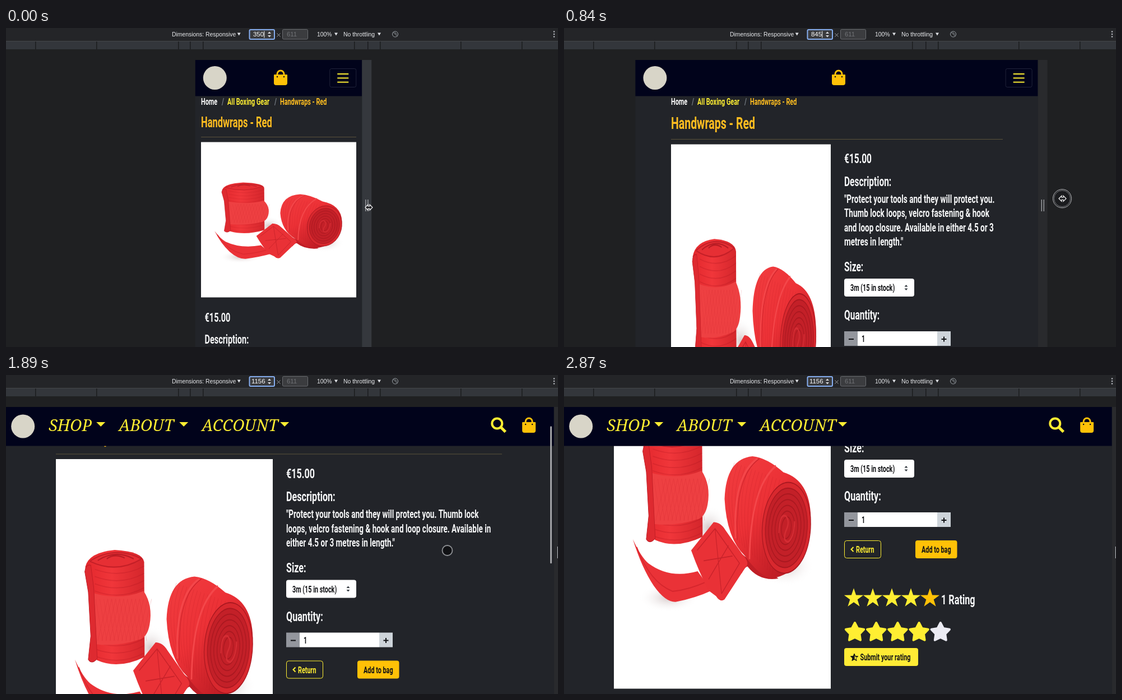
These frames come from a looping animation (985 px wide and 569 px high, 3150 ms). An HTML page with a canvas:

```html
<!DOCTYPE html>
<html lang="en">
<head>
<meta charset="utf-8">
<title>Responsive product page</title>
<style>
html, body { margin: 0; width: 100%; height: 100%; overflow: hidden; background: #1f2022; }
canvas { display: block; }
</style>
</head>
<body>
<canvas id="stage" width="985" height="569"></canvas>
<script>
const ctx = document.getElementById('stage').getContext('2d');
const LOOP = 3150, STEP = 70, ZOOM = 0.85, CENTER = 486.5;
const YELLOW = '#ffee32', AMBER = '#ffc107', INK = '#111215', PAGE = '#222429';
const CONDENSE = 0.66;

// Keyframes: [time, value, value, ...]
const widthKeys = [[350, 350], [420, 372], [490, 415], [560, 470], [630, 536], [700, 625], [770, 730],
  [840, 845], [910, 956], [980, 1040], [1050, 1120], [1120, 1156]];
const scrollKeys = [[1540, 0], [1750, 6], [1820, 22], [1890, 65.5], [1960, 172], [2030, 276.5], [2100, 280]];
const pointerKeys = [[350, 647, 320], [420, 662, 317], [630, 763, 308], [910, 931, 303], [980, 964, 302],
  [1050, 990, 303], [1120, 954, 311], [1540, 954, 311], [1890, 787, 313], [2240, 762, 330],
  [2590, 745, 370], [2870, 700, 590]];

function at(keys, t) {
  const i = keys.findIndex(k => k[0] > t);
  if (i < 0) return keys[keys.length - 1].slice(1);
  if (i === 0) return keys[0].slice(1);
  const a = keys[i - 1], b = keys[i], f = (t - a[0]) / (b[0] - a[0]);
  return a.slice(1).map((v, n) => v + (b[n + 1] - v) * f);
}

function rect(x, y, w, h, fill, radius = 0, stroke, line = 1) {
  ctx.beginPath();
  ctx.roundRect(x, y, w, h, radius);
  if (fill) { ctx.fillStyle = fill; ctx.fill(); }
  if (stroke) { ctx.strokeStyle = stroke; ctx.lineWidth = line; ctx.stroke(); }
}

function circle(x, y, r, fill, stroke, line = 1) {
  rect(x - r, y - r, 2 * r, 2 * r, fill, r, stroke, line);
}

function shape(d, fill, stroke, line = 1) {
  const path = new Path2D(d);
  if (fill) { ctx.fillStyle = fill; ctx.fill(path); }
  if (stroke) { ctx.strokeStyle = stroke; ctx.lineWidth = line; ctx.stroke(path); }
}

function place(x, y, draw) {
  ctx.save();
  ctx.translate(x, y);
  draw();
  ctx.restore();
}

function text(s, x, y, font, color) {
  ctx.font = font;
  ctx.fillStyle = color;
  ctx.fillText(s, x, y);
}

const condensed = size => `600 ${size}px Roboto, sans-serif`;

function label(s, x, y, size, color = '#f8f9fa') {
  place(x, y, () => {
    ctx.scale(CONDENSE, 1);
    text(s, 0, 0, condensed(size), color);
  });
}

function wrap(s, size, width) {
  ctx.font = condensed(size);
  const lines = [''];
  for (const word of s.split(' ')) {
    const next = (lines[lines.length - 1] + ' ' + word).trim();
    if (ctx.measureText(next).width * CONDENSE > width) lines.push(word);
    else lines[lines.length - 1] = next;
  }
  return lines;
}

function triangle(x, y, w, h, color) {
  shape(`M${x - w / 2},${y} h${w} l${-w / 2},${h} z`, color);
}

function spinner(x, y, color) {
  triangle(x, y - 1.5, 6, -3.5, color);
  triangle(x, y + 1.5, 6, 3.5, color);
}

function star(x, y, r, inner, color, round = 0) {
  ctx.beginPath();
  for (let i = 0; i < 10; i++) {
    const a = i * Math.PI / 5, d = i % 2 ? r * inner : r;
    ctx.lineTo(x + d * Math.sin(a), y - d * Math.cos(a));
  }
  ctx.closePath();
  ctx.fillStyle = ctx.strokeStyle = color;
  ctx.fill();
  if (round) { ctx.lineJoin = 'round'; ctx.lineWidth = round; ctx.stroke(); ctx.lineJoin = 'miter'; }
}

function toolbar(width, caret) {
  const ui = '10.4px "Liberation Sans", Arial, sans-serif', digits = '11.4px "Liberation Sans", Arial, sans-serif';
  rect(0, 0, 985, 23, '#242528');
  rect(0, 23, 985, 1, '#45474a');
  rect(0, 24, 985, 14, '#33363b');
  for (const x of [52, 161, 307, 328, 351, 621, 645, 667, 811, 920]) rect(x, 24, 1.5, 14, '#1b1c1e');
  text('Dimensions: Responsive', 296, 14.5, ui, '#e8eaed');
  text('100%', 555, 14.5, ui, '#e8eaed');
  text('No throttling', 602, 14.5, ui, '#e8eaed');
  for (const x of [415.7, 589, 666]) triangle(x, 8.5, 6, 5, '#dfe1e5');
  rect(434.5, 3, 44.5, 17, '#3a3b3e', 2, '#86aef0', 2);
  const value = String(Math.round(width)), x = value.length > 3 ? 438 : 441;
  text(value, x, 15.2, digits, '#fff');
  if (caret) rect(x + value.length * 6.34 + 0.3, 5.5, 1, 12, '#fff');
  spinner(470, 11.5, '#d8d9dc');
  shape('M483.5,9.5 l6,6 m0,-6 l-6,6', null, '#a0a3a8');
  rect(493.5, 2.5, 45, 17.5, '#3b3c3f', 2, '#6a6c70');
  text('611', 501, 15.2, digits, '#717377');
  circle(694.5, 11, 5, null, '#9aa0a6');
  shape('M690.5,7 l8,8 m-5,-7.5 l4,4', null, '#9aa0a6');
  for (const y of [6.5, 11, 15.5]) circle(978, y, 1.3, '#b6b9be');
}

function bag(x, y) {
  rect(x - 12, y + 8, 24, 19, AMBER, [1, 1, 4, 4]);
  shape(`M${x - 6},${y + 10} v-3 a6,6 0 0 1 12,0 v3`, null, AMBER, 3);
  circle(x - 6, y + 12, 1.2, '#02031b');
  circle(x + 6, y + 12, 1.2, '#02031b');
}

function navbar(left, right, bottom, wide) {
  rect(left, 57, right - left, bottom - 57, '#01031b');
  circle(left + 35, wide ? 91.5 : 89, 21, '#d8d5c8');
  if (!wide) {
    bag(490, 75);
    rect(right - 57.5, 72.5, 47, 33, null, 3, '#20233a');
    for (const y of [82, 89.3, 96.6]) rect(right - 44, y - 1, 20, 2, YELLOW);
    return;
  }
  [['SHOP', 81, 174], ['ABOUT', 206, 322], ['ACCOUNT', 354, 502]].forEach(([name, x, arrow]) => {
    text(name, left + x, 100, 'italic 28.5px "Noto Serif", serif', YELLOW);
    triangle(left + arrow, 84, 16, 8, YELLOW);
  });
  circle(right - 101.5, 86.5, 9, null, YELLOW, 4);
  shape(`M${right - 95},93 l8.5,8.5`, null, YELLOW, 5);
  bag(right - 44.7, 76);
}

function shadow(x, y, rx, ry) {
  place(x, y, () => {
    ctx.scale(rx, ry);
    const g = ctx.createRadialGradient(0, 0, 0, 0, 0, 1);
    g.addColorStop(0, 'rgba(150,120,120,.4)');
    g.addColorStop(1, 'rgba(255,255,255,0)');
    circle(0, 0, 1, g);
  });
}

// Two hand wraps on white, drawn in a 435 x 435 space.
function product(x, y, w, h) {
  rect(x, y, w, h, '#fff');
  place(x, y, () => {
    ctx.beginPath();
    ctx.rect(0, 0, w, h);
    ctx.clip();
    ctx.scale(w / 435, h / 435);
    shadow(190, 235, 42, 28);
    shadow(110, 322, 60, 18);
    shadow(345, 282, 56, 26);

    const side = ctx.createLinearGradient(60, 0, 190, 0);
    side.addColorStop(0, '#e3282d');
    side.addColorStop(0.4, '#f0363a');
    side.addColorStop(1, '#cf2329');
    shape('M59,134 Q66,116 118,113 Q174,115 177,128 L178,246 Q125,262 82,250 Z', side);
    ctx.globalAlpha = 0.25;
    for (let i = 0; i < 13; i++) shape(`M78,${137 + i * 9} Q130,${149 + i * 9} 177,${133 + i * 9}`, null, '#a9131d', 1.2);
    ctx.globalAlpha = 1;
    shape('M68,127 Q118,107 172,124 Q122,143 68,127', '#e62f34', '#c41f27', 1.5);
    shape('M84,126 Q120,112 156,124 M102,124 Q118,117 138,123', null, '#b81c24', 1.6);
    shape('M77,167 Q130,176 176,164 Q195,182 188,206 Q184,220 170,224 Q120,234 79,230 Z', '#ee4042');
    ctx.globalAlpha = 0.2;
    for (let i = 0; i < 12; i++) shape(`M${80 + i * 8},174 l14,52 m10,-52 l-20,52`, null, '#c5202a');
    ctx.globalAlpha = 1;
    shape('M58,140 Q60,130 70,132 L76,160 L83,248 Q72,256 65,249 L70,220 L65,165 Z', '#de2a30', '#c01d25');

    shape('M38,249 Q54,271 69,279 Q112,299 168,289 L196,313 Q165,322 125,327 Q104,328 80,307 Q56,285 38,249', '#ea3237');
    shape('M46,259 Q72,303 118,314 Q150,312 186,302', null, '#d5262d', 1.5);
    shape('M245,260 Q262,272 278,276 L330,298 Q292,302 268,283 Q262,284 256,292 Z', '#c01e26');
    shape('M155,263 L200,228 Q214,228 224,238 L258,268 Q274,279 264,284 L222,324 Q213,328 205,320 L190,313 Q172,292 155,263', '#e93136');
    shape('M167,263 L203,236 L252,279 L216,317 M180,276 L238,270 M203,236 L216,317 M190,299 L230,257', null, '#c8222a', 1.3);

    const body = ctx.createLinearGradient(225, 155, 330, 290);
    body.addColorStop(0, '#f13c3f');
    body.addColorStop(0.5, '#ec3136');
    body.addColorStop(1, '#c01d25');
    shape('M222,199 Q225,149 278,146 Q308,148 340,166 Q393,176 395,222 Q392,290 316,298 Q290,294 263,270 Q226,248 222,199', body);
    ctx.globalAlpha = 0.2;
    for (let i = 0; i < 16; i++) shape(`M${242 + i * 7},${154 + i * 1.6} Q${218 + i * 7},${190 + i * 3} ${243 + i * 5},${248 + i * 3}`, null, '#b01620');
    ctx.globalAlpha = 1;
    shape('M288,149 Q238,170 244,248 M325,158 Q274,185 272,274', null, '#f4474a', 3);
    shape('M292,149 Q242,170 248,250', null, '#cc232b', 1);
    place(346, 235, () => {
      ctx.rotate(0.25);
      for (let i = 0; i < 7; i++) {
        ctx.beginPath();
        ctx.ellipse(0, 0, 48 - i * 6.4, 57 - i * 7.2, 0, 0, 7);
        ctx.fillStyle = i ? '#c32028' : '#d8282e';
        ctx.strokeStyle = '#aa1820';
        ctx.lineWidth = 1.4;
        ctx.fill();
        ctx.stroke();
      }
      shape('M-13,10 Q-18,-14 -5,-14 Q6,-10 0,4 Q-4,18 8,16 Q18,8 14,-12', null, '#d42c33', 2.5);
    });
  });
}

const DESCRIPTION = '"Protect your tools and they will protect you. Thumb lock loops, velcro fastening & hook and ' +
  'loop closure. Available in either 4.5 or 3 metres in length."';

function details(x, y, size, lines) {
  const step = 16 + size * 1.27, big = size * 1.206;
  label('€15.00', x, y, big);
  label('Description:', x, y + step, big);
  lines.forEach((line, i) => label(line, x, y + step + 30 + i * 25.5, 20.5));
  place(x, Math.floor(y + step - 41.5 + (lines.length - 3) * 25.5), () => {
    label('Size:', 0, 168.5, big);
    rect(0, 182, 125, 32, '#fff', 4);
    label('3m (15 in stock)', 11, 204, 16.4, INK);
    spinner(110.5, 198, '#343a40');
    label('Quantity:', 0, 255, big);
    rect(0, 276, 24, 26, '#93969d');
    rect(24, 276, 142, 26, '#fff');
    rect(166, 276, 24, 26, '#ced4da');
    rect(8, 289, 9, 2, INK);
    rect(173.5, 289, 9, 2, INK);
    rect(177, 285.5, 2, 9, INK);
    label('1', 31, 295, 16.4, INK);
    rect(0.5, 326.5, 65, 31, null, 4, YELLOW);
    shape('M16.5,338 l-4,4 l4,4', null, YELLOW, 2);
    label('Return', 21, 348, 16.4, YELLOW);
    rect(127, 326, 74.5, 32, AMBER, 4);
    label('Add to bag', 138, 348, 16.4, INK);
    for (let i = 0; i < 5; i++) {
      star(17 + i * 34, 429.3, 18, 0.39, i < 4 ? YELLOW : AMBER);
      star(19 + i * 38.2, 490, 17, 0.52, i < 4 ? YELLOW : '#ebebf3', 4);
    }
    label('1 Rating', 173, 440, 24.6);
    rect(0, 518, 132, 32, '#ffeb35', 4);
    star(18, 535, 7, 0.45, INK, 1);
    shape('M18.6,531 l1.2,2.8 3,.3 -2.2,2 .6,2.7 -2.6,-1.4 z', '#ffeb35');
    label('Submit your rating', 28.5, 540, 16.4, INK);
  });
}

function page(width, scroll, scrollbar) {
  const half = width * ZOOM / 2, left = CENTER - half, right = CENTER + half;
  const wide = width >= 992, twoColumns = width >= 768, navBottom = wide ? 126.5 : 121.5;
  rect(left, 57, 2 * half, 512, PAGE);

  const container = (wide ? 960 : twoColumns ? 720 : width >= 576 ? 540 : width) * ZOOM;
  const x = Math.round(CENTER - container / 2 + 10.2), inner = Math.round(container - 20.4);
  const title = (21.2 + 0.009 * width) * ZOOM, subtitle = (20.4 + 0.003 * width) * ZOOM;
  const grow = title - 20.7, rule = Math.floor(navBottom + 72.6 + grow * 1.2), top = rule + 9.5;
  const column = twoColumns ? Math.round(container / 2 - 20.8) : inner;
  const lines = wrap(DESCRIPTION, 20.5, column - 8);
  const height = twoColumns ? 624 + (lines.length - 3) * 25.5 : column;

  ctx.save();
  ctx.beginPath();
  ctx.rect(left, navBottom, 2 * half, 569 - navBottom);
  ctx.clip();
  ctx.translate(0, -scroll);
  [['Home', 0, '#fff'], ['/', 37, '#7b828a'], ['All Boxing Gear', 47, YELLOW], ['/', 131, '#7b828a'],
    ['Handwraps - Red', 141, '#ffbd20']].forEach(([s, dx, color]) => label(s, x + dx, navBottom + 15.7, 16.4, color));
  label('Handwraps - Red', x, navBottom + 55.5 + grow * 0.8, title * 1.206, '#ffbd20');
  rect(x, rule, inner, 1, '#5b523b');
  product(x, top, column, height);
  if (twoColumns) details(CENTER + 13.5, top + 33.7, subtitle, lines);
  else details(x + 6.5, top + height + 43.5, subtitle, lines);
  ctx.restore();

  navbar(left, right, navBottom, wide);
  if (scrollbar) rect(971, 60.5 + scroll * 0.47, 3, 245, '#a2a3a6', 1.5);
  return right;
}

function pointer(t, x, y) {
  if (t >= 1120) {
    circle(x + 0.5, y, 9, '#101114', '#8e9094', 1.8);
    return;
  }
  if (t >= 280) {
    circle(x, y, 16.5, '#1a1b1e', '#b9babd');
    circle(x, y, 14.5, null, '#77797d');
  }
  shape(`M${x - 6},${y} l5,-5 v3 h3 v-3 l5,5 l-5,5 v-3 h-3 v3 z`, '#1a1b1e', '#f1f1f2', 1.2);
}

function draw(now) {
  const t = Math.floor(now % LOOP / STEP) * STEP;
  const [width] = at(widthKeys, t), [scroll] = at(scrollKeys, t);
  rect(0, 0, 985, 569, '#1f2022');
  const caretOff = (t >= 140 && t < 420) || (t >= 1680 && t < 2100) || t >= 2660;
  toolbar(width, !caretOff);
  const right = page(width, scroll, scroll > 0 && t < 2800);
  rect(right, 57, 17, 512, t < 420 ? '#35383d' : '#292a2d');
  for (const dx of [6, 10]) rect(right + dx, 306, 1.3, 21, '#a9abaf');
  pointer(t, ...at(pointerKeys, t));
  requestAnimationFrame(draw);
}
requestAnimationFrame(draw);
</script>
</body>
</html>
```
